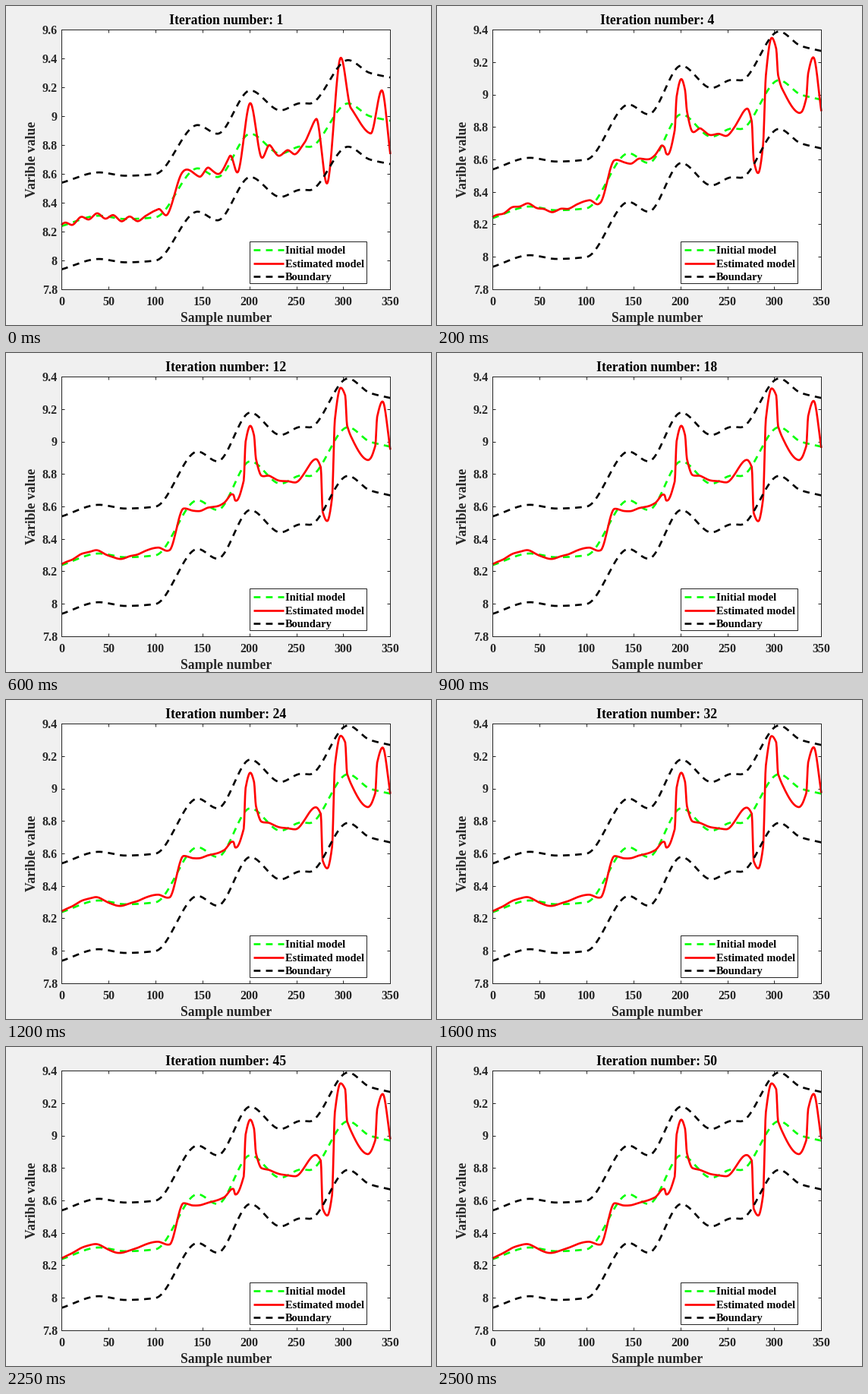
Write a matplotlib script that moves like this. It is 560 by 420 pixels and loops after 2550 ms.

```python
import numpy as np
import matplotlib.pyplot as plt
from matplotlib.animation import FuncAnimation
from matplotlib.patches import Rectangle
from matplotlib.ticker import FormatStrFormatter, MultipleLocator

W, H, DPI = 560, 420, 80
PT = 72 / DPI                      # points per pixel
LEFT, RIGHT, TOP, BOTTOM = 73, 506.4, 31, 373
INK = "#262626"
GREEN, RED, BLACK = "#00ff00", "#ff0000", "#000000"
STROKE = 2.667 * PT
DASH = (0, (3.3, 2.7))

plt.rcParams.update({
    "font.family": "Liberation Serif",
    "font.weight": "bold",
    "axes.linewidth": PT,
    "lines.dash_capstyle": "butt",
    "lines.solid_capstyle": "butt",
})

samples = np.linspace(0, 350, 701)


def smooth(points):
    """Monotone cubic through (sample, value) points, flat at the extremes."""
    x, y = np.array(points, float).T
    h = np.diff(x)
    d = np.diff(y) / h
    m = np.concatenate([d[:1], np.zeros(len(d) - 1), d[-1:]])
    same = np.flatnonzero(d[:-1] * d[1:] > 0)
    a, b = d[same], d[same + 1]
    wa = h[same] + 2 * h[same + 1]
    wb = 2 * h[same] + h[same + 1]
    m[same + 1] = (wa + wb) / (wa / b + wb / a)
    k = np.clip(np.searchsorted(x, samples, side="right") - 1, 0, len(h) - 1)
    t = (samples - x[k]) / h[k]
    return (y[k] * (1 + 2 * t) * (1 - t) ** 2
            + y[k + 1] * t * t * (3 - 2 * t)
            + h[k] * t * (1 - t) * (m[k] * (1 - t) - m[k + 1] * t))


initial = smooth([
    (0, 8.238), (40, 8.31), (68, 8.287), (100, 8.299), (145, 8.638),
    (166, 8.578), (201, 8.878), (233, 8.74), (255, 8.79), (264, 8.787),
    (305, 9.088), (328, 9.0), (350, 8.968)])

# The first estimate swings around the initial model: an even ripple,
# then growing overshoots.
ripple = [(3.4 + 8.65 * k, 0.017 * (-1) ** k) for k in range(-1, 11)]
swings = [
    (103, .05), (113, -.052), (128, .071), (147, -.056), (157, .04),
    (168, .02), (179, .05), (188, -.17), (201, .212), (213, -.121),
    (222, .02), (231, -.016), (240, .011), (249, -.044), (258, .02),
    (271, .17), (283, -.385), (297, .345), (308, -.028), (329, -.118),
    (341, .199), (350, -.231)]
first = initial + smooth(ripple + swings)

# The estimate settles into steep blocks.
settled = smooth([
    (0, 8.243), (36, 8.332), (60, 8.276), (102, 8.345), (115, 8.327),
    (130, 8.58), (140, 8.566), (173, 8.617), (183, 8.67), (185, 8.637),
    (194, 8.74), (196, 9.01), (201, 9.098), (205, 9.045), (207, 8.89),
    (213, 8.805), (249, 8.75), (270, 8.873), (276, 8.848), (278, 8.54),
    (283, 8.505), (288, 8.62), (291, 9.15), (297, 9.315), (302, 9.285),
    (304, 9.08), (326, 8.885), (334, 8.97), (336, 9.17), (342, 9.262),
    (350, 8.995)])


def estimate(n):
    return settled + (first - settled) * n ** -0.7


fig = plt.figure(figsize=(W / DPI, H / DPI), dpi=DPI, facecolor="#f0f0f0")
ax = fig.add_axes([LEFT / W, 1 - BOTTOM / H,
                   (RIGHT - LEFT) / W, (BOTTOM - TOP) / H])
ax.set_xlim(0, 350)
ax.xaxis.set_major_locator(MultipleLocator(50))
ax.yaxis.set_major_locator(MultipleLocator(0.2))
ax.yaxis.set_major_formatter(FormatStrFormatter("%g"))
ax.tick_params(direction="in", top=True, right=True, length=4 * PT, width=PT,
               color=INK, labelcolor=INK, labelsize=16 * PT)
ax.tick_params(axis="x", pad=9.5 * PT)
ax.tick_params(axis="y", pad=5 * PT)
for spine in ax.spines.values():
    spine.set_color(INK)

ax.plot(samples, initial, color=GREEN, lw=STROKE, ls=DASH)
red_line, = ax.plot(samples, first, color=RED, lw=STROKE, clip_on=False)
for offset in (0.3, -0.3):
    ax.plot(samples, initial + offset, color=BLACK, lw=STROKE, ls=DASH)

# Overlay in pixel coordinates for the labels and the legend.
top = fig.add_axes([0, 0, 1, 1], zorder=5)
top.set_xlim(0, W)
top.set_ylim(H, 0)
top.axis("off")


def label(x, y, text, size, color=BLACK, ha="center", rotation=0):
    return top.text(x, y, text, fontsize=size * PT, color=color, ha=ha,
                    va="baseline", rotation=rotation, rotation_mode="anchor")


title = label(290, 24, "", 17.6)
label(290, 416.5, "Sample number", 17.6, INK)
label(39, 202, "Varible value", 17.6, INK, rotation=90)

top.add_patch(Rectangle((321, 310), 154, 55, fc="white", ec=INK, lw=PT))
for y, text, color, style in ((321, "Initial model", GREEN, DASH),
                              (339, "Estimated model", RED, "-"),
                              (356, "Boundary", BLACK, DASH)):
    top.plot([326, 366], [y, y], color=color, lw=STROKE, ls=style)
    label(368, y + 5, text, 14.4, ha="left")


def draw(tick):
    n = max(tick, 1)               # the first iteration is held twice as long
    values = estimate(n)
    red_line.set_ydata(values)
    peak = max(values.max(), initial.max() + 0.3)
    ax.set_ylim(7.8, np.ceil(5 * peak) / 5)
    title.set_text(f"Iteration number: {n}")
    return red_line, title


anim = FuncAnimation(fig, draw, frames=51, interval=50, repeat=True,
                     repeat_delay=0, blit=False)
plt.show()
```
